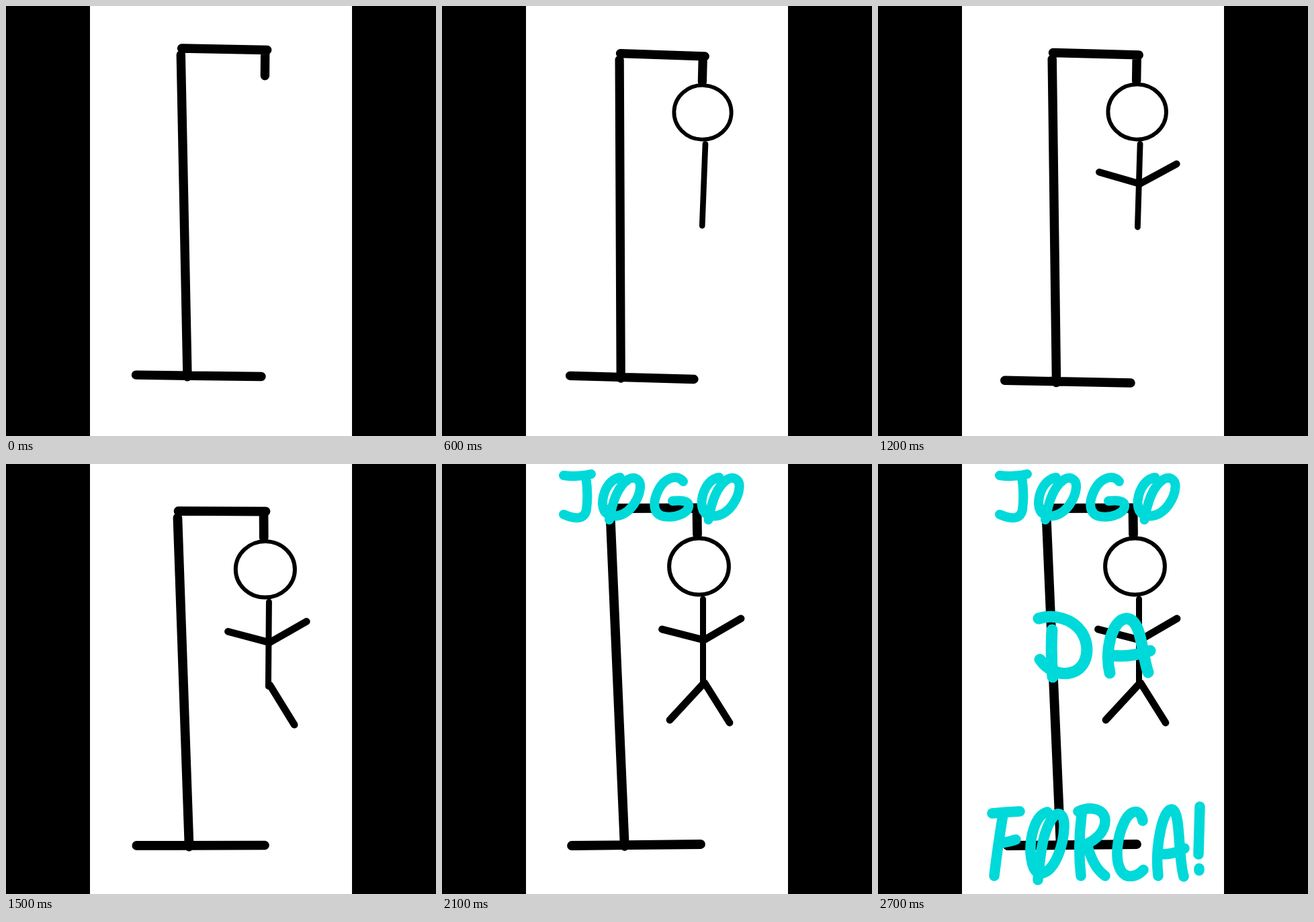
Animation, 640 px wide and 640 px high, one loop 3300 ms. Source, as an HTML page:

```html
<!DOCTYPE html>
<html lang="pt">
<head>
<meta charset="utf-8">
<title>Jogo da forca</title>
<style>
  html, body { margin: 0; width: 100%; height: 100%; overflow: hidden; background: #000; }
  svg { display: block; width: 100%; height: 100%; }
  path { fill: none; stroke-linecap: round; stroke-linejoin: round; }
  #drawing { stroke: #000; }
  .word { stroke: #00d9d9; }
</style>
</head>
<body>
<svg viewBox="0 0 640 640" role="img" aria-label="JOGO DA FORCA!">
  <rect x="125" width="390" height="640" fill="#fff"/>

  <!-- data-step: the step at which a part appears -->
  <g id="drawing">
    <path stroke-width="13.8" d="M193 568L385 566M250.5 76L271.8 569M251.5 66L382.5 65.5M379.5 70L380 105"/>
    <ellipse data-step="1" cx="382.5" cy="152.4" rx="44.4" ry="42" fill="#fff" stroke-width="6"/>
    <path data-step="2" stroke-width="9" d="M388.5 201V328"/>
    <path data-step="3" stroke-width="10.8" d="M390 262L445 230"/>
    <path data-step="4" stroke-width="10.8" d="M390 262L327.5 246"/>
    <path data-step="5" stroke-width="10.8" d="M391 326L428 385"/>
    <path data-step="6" stroke-width="10.8" d="M389 327L339 381"/>
  </g>

  <g class="word" data-step="7" stroke-width="14">
    <path d="M181 17Q202 20 222 15M214 18Q218 45 215 68Q211 88 181 75"/>
    <path id="o" d="M265 20C247 23 239 44 239 59C240 76 251 79 262 77C282 73 294 49 295 35C296 22 286 18 277 23C261 34 254 56 249 83"/>
    <path d="M359 26C349 14 331 21 322 39C312 59 315 75 330 78C348 81 366 73 367 63C368 54 356 54 343 55"/>
    <use href="#o" x="147.5"/>
  </g>

  <g class="word" data-step="8" stroke-width="17">
    <path d="M239 230C262 223 289 230 303 250C317 273 311 297 296 307C278 317 255 311 241 291M259 247Q257 284 260 317"/>
    <path d="M345 311C337 278 348 231 370 230C393 231 392 282 402 310M348 285Q376 288 405 278"/>
  </g>

  <g class="word" data-step="9" stroke-width="15.5">
    <path d="M170 520Q190 518 211 517M186 522Q178 570 173 613M181 564Q194 563 205 559"/>
    <path d="M252 518C234 522 226 555 227 579C229 605 237 613 248 608C265 600 276 567 277 541C278 521 269 516 261 525C246 544 242 576 238 619"/>
    <path d="M303 522Q297 568 302 613M298 517C318 508 338 514 338 531C338 548 323 560 311 565C316 586 324 603 338 613"/>
    <path d="M394 531C391 512 376 514 367 532C355 556 352 590 362 606C371 619 387 613 395 604"/>
    <path d="M417 613C412 572 423 514 437 514C451 514 446 583 455 614M419 580Q437 583 456 572"/>
    <path d="M479 510L477 581M478 602V605"/>
  </g>
</svg>
<script>
  const LOOP = 3300, STEP = 300;
  // Where the beam's left end [x, y] and the base's right end [x, y] lie
  const rest = [251, 66, 385, 566];
  const poses = [
    [261, 63, 380, 551.5],
    [264, 68.5, 377, 552],
    [265, 70.5, 375, 555.5],
    [259.5, 69.5, 375, 560.5],
    [260, 69.5, 376, 561],
    [256, 70, 385, 567.5],
    rest
  ];
  const drawing = document.getElementById("drawing");
  const parts = document.querySelectorAll("[data-step]");

  // Shift, turn and scale that carry the resting ends to the pose's ends
  function place([ax, ay, bx, by]) {
    const [rx, ry, sx, sy] = rest;
    const u = sx - rx, v = sy - ry, x = bx - ax, y = by - ay;
    const size = u * u + v * v;
    const c = (x * u + y * v) / size, s = (y * u - x * v) / size;
    return `translate(${ax} ${ay}) matrix(${c} ${s} ${-s} ${c} 0 0) translate(${-rx} ${-ry})`;
  }

  function draw() {
    const step = Math.min(9, Math.floor(performance.now() % LOOP / STEP));
    drawing.setAttribute("transform", place(poses[Math.min(step, 6)]));
    for (const part of parts)
      part.style.display = step >= part.dataset.step ? "" : "none";
    requestAnimationFrame(draw);
  }
  draw();
</script>
</body>
</html>
```
